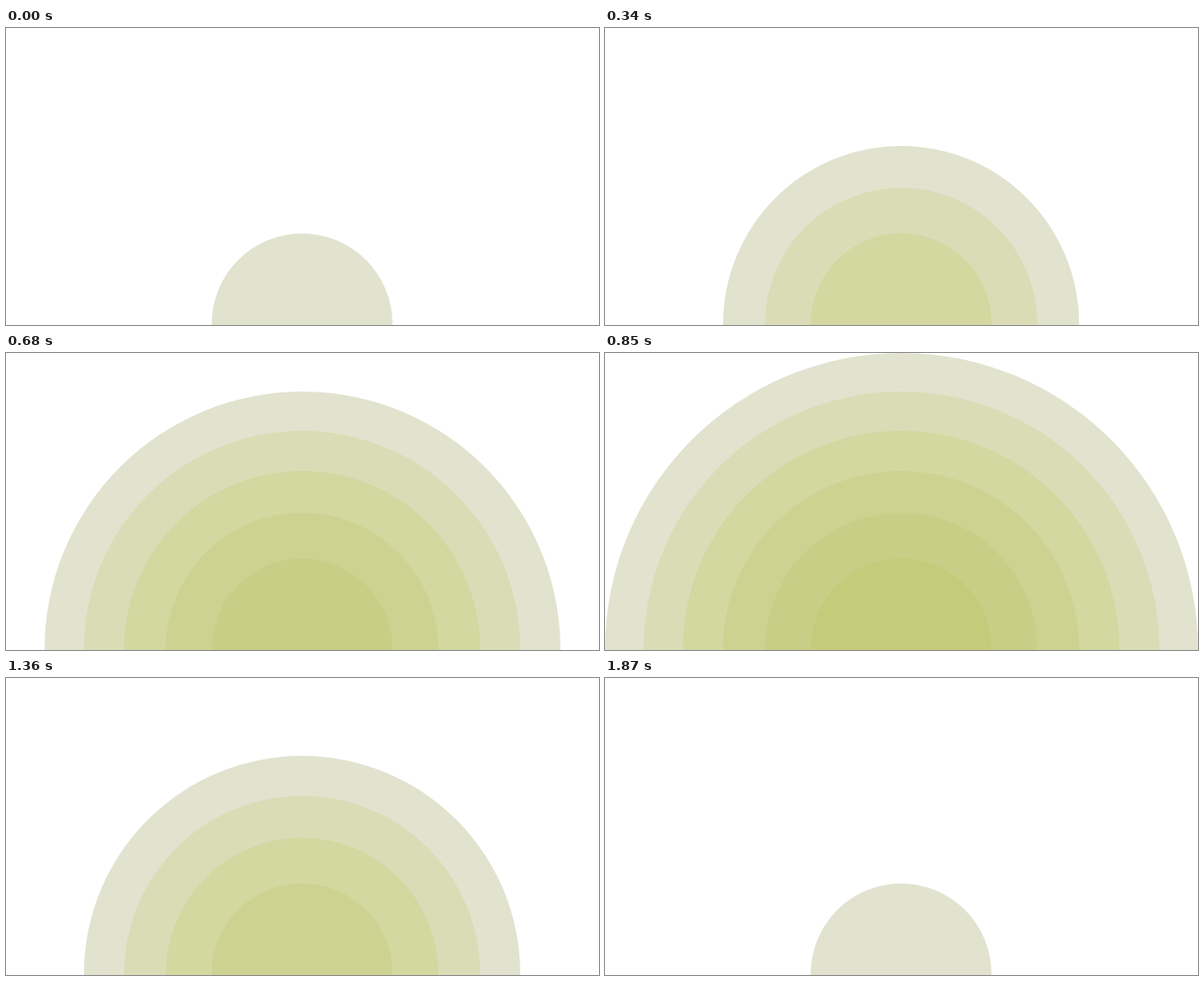
These frames come from a looping animation (738 px wide and 370 px high, 1940 ms). An HTML page:

```html
<!DOCTYPE html>
<html lang="en">
<head>
<meta charset="utf-8">
<title>Growing rings</title>
<style>
  html, body { margin: 0; width: 100%; height: 100%; overflow: hidden; background: #fff; }
  svg { display: block; width: 738px; height: 370px; }
</style>
</head>
<body>
<svg id="stage" viewBox="0 0 738 370"></svg>
<script>
  const LOOP = 1940, STEP = 170, HOLD = 340, PEAK = 5;
  // left and right edge of each disc, smallest first; the top equals the left
  const edges = [[256, 481], [199, 538], [147, 590], [97, 640], [48, 690], [0, 738]];
  // ring colours from the rim inwards
  const colors = ['#e1e3cf', '#dadcb5', '#d3d7a0', '#cdd291', '#c9ce86', '#c6ca7b'];
  const stage = document.getElementById('stage');

  const discs = edges.map(([left, right]) => {
    const disc = document.createElementNS('http://www.w3.org/2000/svg', 'circle');
    const r = (right - left) / 2;
    disc.setAttribute('cx', left + r);
    disc.setAttribute('cy', left + r);
    disc.setAttribute('r', r);
    stage.prepend(disc);
    return disc;
  });

  function levelAt(time) {
    const top = PEAK * STEP;
    if (time < top) return Math.floor(time / STEP);
    if (time < top + HOLD) return PEAK;
    return Math.max(0, PEAK - 1 - Math.floor((time - top - HOLD) / STEP));
  }

  function draw(time) {
    const level = levelAt(time % LOOP);
    discs.forEach((disc, i) => {
      disc.setAttribute('fill', i <= level ? colors[level - i] : 'none');
    });
  }

  const start = performance.now();
  function tick() {
    draw(performance.now() - start);
    requestAnimationFrame(tick);
  }
  tick();
</script>
</body>
</html>
```
